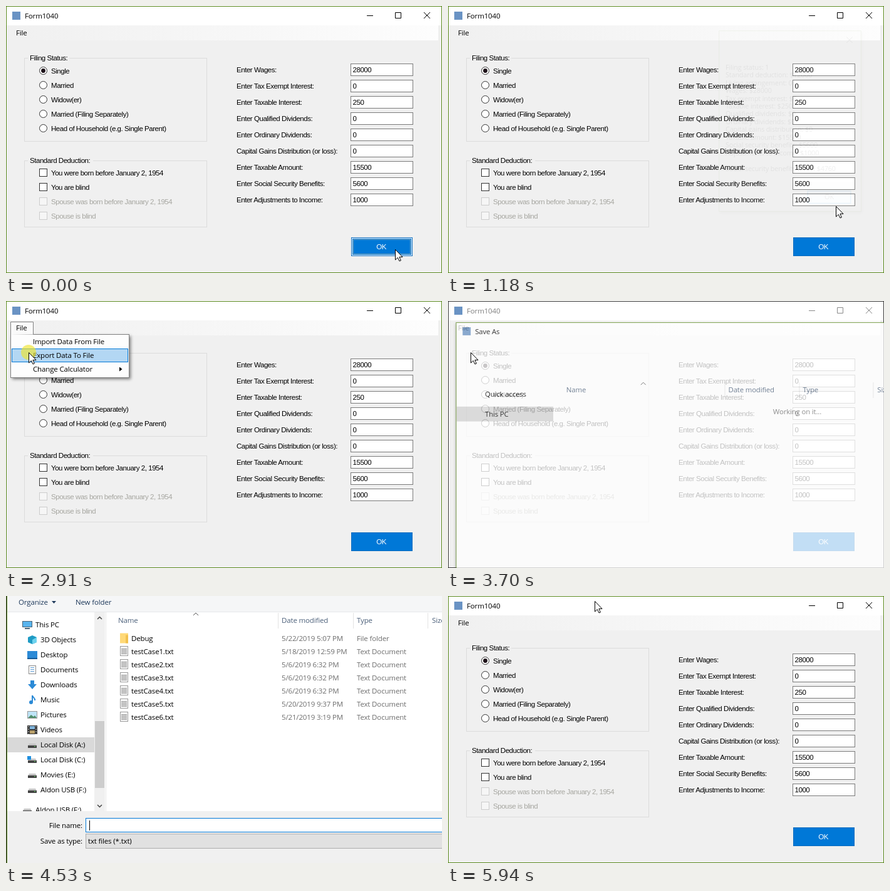
Write an HTML page that moves like this. It is 696 by 427 pixels and loops after 6890 ms.

```html
<!DOCTYPE html>
<html lang="en">
<head>
<meta charset="utf-8">
<title>Tax form</title>
<style>
html, body { margin: 0; width: 100%; height: 100%; overflow: hidden; background: #f0f0f0; }
svg { display: block; width: 696px; height: 427px; }
text { font: 11.5px "Open Sans", "Noto Sans", sans-serif; letter-spacing: -.15px; white-space: pre; }
.form text { font: 11.5px "Liberation Sans", Arial, sans-serif; letter-spacing: -.45px; }
.form .ui text { font: 11.5px "Open Sans", "Noto Sans", sans-serif; letter-spacing: -.15px; }
.end { text-anchor: end; }
.mid { text-anchor: middle; }
.idle .chrome { stroke: #8a8a8a; }
.idle .title { fill: #808080; }
.idle .edge { stroke: #3c3c3c; }
.chrome { stroke: #000; fill: none; }
.edge { stroke: #5b8a1e; fill: none; }
</style>
</head>
<body>
<svg viewBox="0 0 696 427" xmlns="http://www.w3.org/2000/svg">
  <defs>
    <linearGradient id="strip"><stop stop-color="#f0f0f0"/><stop offset="1" stop-color="#fdfdfd"/></linearGradient>
    <filter id="soft" x="-10%" y="-10%" width="120%" height="120%"><feGaussianBlur stdDeviation="2.5"/></filter>
  </defs>
  <g id="form" class="form"></g>
  <g id="box"></g>
  <g id="save"></g>
  <circle id="click" r="12" fill="#f0e52c" fill-opacity=".65"/>
  <path id="cursor" d="M.5 .5V17L4.3 13.4L7 19L9.4 18L6.9 12.4H12Z" fill="#fff" stroke="#000"/>
</svg>
<script>
const LOOP = 6890;
const $ = id => document.getElementById(id);

// Drawing helpers; y of a text is its vertical middle.
const text = (x, y, s, fill = '#000', cls = '') =>
  `<text x="${x}" y="${y + 4}" fill="${fill}" class="${cls}">${s}</text>`;
const rect = (x, y, w, h, fill, more = '') =>
  `<rect x="${x}" y="${y}" width="${w}" height="${h}" fill="${fill}" ${more}/>`;
const frame = (x, y, w, h, fill, stroke, more = '') =>
  rect(x + .5, y + .5, w - 1, h - 1, fill, `stroke="${stroke}" ${more}`);
const path = (d, stroke, fill = 'none', more = '') =>
  `<path d="${d}" stroke="${stroke}" fill="${fill}" ${more}/>`;
const group = (id, body, cls = '') => `<g id="${id}" class="${cls}">${body}</g>`;
const each = (list, fn) => list.map(fn).join('');

function buildForm() {
  const status = ['Single', 'Married', 'Widow(er)', 'Married (Filing Separately)',
    'Head of Household (e.g. Single Parent)'];
  const checks = ['You were born before January 2, 1954', 'You are blind',
    'Spouse was born before January 2, 1954', 'Spouse is blind'];
  const fields = [['Enter Wages:', 28000], ['Enter Tax Exempt Interest:', 0],
    ['Enter Taxable Interest:', 250], ['Enter Qualified Dividends:', 0],
    ['Enter Ordinary Dividends:', 0], ['Capital Gains Distribution (or loss):', 0],
    ['Enter Taxable Amount:', 15500], ['Enter Social Security Benefits:', 5600],
    ['Enter Adjustments to Income:', 1000]];
  const caption = (y, h, w, s) => frame(29, y, 292, h, 'none', '#dcdcdc') +
    rect(35, y - 3, w, 8, '#f0f0f0') + text(38, y, s);

  const top = rect(0, 0, 696, 427, '#f0f0f0') + rect(0, 0, 696, 31, '#fff') +
    rect(1, 31, 689, 24, 'url(#strip)') + rect(10, 9, 13, 13, '#6a93c4') +
    text(30, 15.5, 'Form1040', '#000', 'title') +
    '<path class="chrome" d="M576 15.5H586M621.5 10.5H630.5V19.5H621.5ZM667 10L677 20M677 10L667 20"/>';

  const left = caption(83, 134, 66, 'Filing Status:') +
    each(status, (s, i) => {
      const y = 103.5 + 23 * i;
      return `<circle cx="59.5" cy="${y}" r="6" fill="#fff" stroke="#333"/>` +
        (i ? '' : `<circle cx="59.5" cy="${y}" r="3.4" fill="#1c1018"/>`) + text(72, y + .5, s);
    }) +
    caption(247, 107, 104, 'Standard Deduction:') +
    each(checks, (s, i) => {
      const y = 267 + 23 * i, off = i > 1;
      return frame(53, y - 7, 13, 13, off ? '#f6f6f6' : '#fff', off ? '#ccc' : '#333') +
        text(72, y, s, off ? '#a6a6a0' : '#000');
    });

  const right = each(fields, ([label, value], i) => {
    const y = 102 + 26 * i;
    return text(368, y, label) + frame(550, y - 10, 100, 20, '#fff', '#7a7a7a') + text(553.5, y, value);
  });

  const button = frame(551, 370, 98, 30, '#0078d7', '#0a6cbf') +
    group('focus', frame(552, 371, 96, 28, 'none', '#fff') +
      frame(554, 373, 92, 24, 'none', '#e8c8a0', 'stroke-dasharray="1 1"')) +
    text(599, 385, 'OK', '#fff', 'mid');

  const menu = rect(10, 56, 189, 69, '#000', 'opacity=".5" filter="url(#soft)"') +
    frame(7, 53, 190, 70, '#fdfdfd', '#808080') +
    path('M7.5 54V33.5H43.5V53.5', '#808080', '#fafafa') +
    `<rect id="pick" x="9.5" width="185" height="21" fill="#b3d7f3" stroke="#0078d7"/>` +
    each(['Import Data From File', 'Export Data To File', 'Change Calculator'],
      (s, i) => text(43, 65 + 22 * i, s)) +
    path('M181 105.5L185.5 109L181 112.5Z', 'none', '#000');

  $('form').innerHTML = `<g class="ui">${top}</g>` + left + right + button +
    group('menu', menu, 'ui') + `<g class="ui">${text(16, 43, 'File')}</g>` +
    '<rect class="edge" x=".5" y=".5" width="695" height="426"/>';
}

function buildBox() {
  const lines = ['Filing status: 1', 'Standard deduction: $12000', 'Living arrangement: 0',
    'Wages: $28000', 'Tax exempt interest: $0', 'Taxable interest: $250',
    'Qualified dividends: $0', 'Ordinary dividends: $0', 'Capital gains distribution: $0',
    'Taxable amount: $15500', 'Social security benefits: $5600',
    'Adjustments to income: $1000', '', 'Social security benefits value: $4760'];
  $('box').innerHTML = rect(427, 33, 242, 308, '#000', 'opacity=".35" filter="url(#soft)"') +
    frame(425, 30, 242, 308, '#fff', '#5b8a1e') + rect(426, 289, 240, 48, '#f0f0f0') +
    path('M642 41L652 51M652 41L642 51', '#000') +
    each(lines, (s, i) => text(436.5, 92.5 + 13.25 * i, s)) +
    '<rect id="boxOk" x="576" y="303" width="73" height="21" stroke="#0078d7" stroke-width="2"/>' +
    text(612.5, 313.5, 'OK', '#000', 'mid');
}

function navIcon(kind, x, y) {
  const blue = '#2b8ad6';
  const art = {
    pc: () => frame(-8, -6, 16, 10, '#58b4ee', '#4a6478') + rect(-4, 5, 8, 2, '#4a6478'),
    cube: () => path('M0 -7L7 -4V4L0 7L-7 4V-4Z', 'none', '#1f9bc4') + path('M0 0L7 -4V4L0 7Z', 'none', '#6fd3ee'),
    desk: () => rect(-8, -6, 16, 11, blue) + rect(-8, 5, 16, 2, '#155a96'),
    doc: () => frame(-6, -7, 12, 14, '#fff', '#8a8a8a') + path('M-3 -3.5H3M-3 -.5H3M-3 2.5H3', '#5b9bd5'),
    down: () => path('M-3 -7H3V-1H7L0 7L-7 -1H-3Z', 'none', blue),
    note: () => path('M0 -7C1 -3 5 -3 4 1', blue, 'none', 'stroke-width="2"') +
      path('M0 -7V4', blue, 'none', 'stroke-width="2"') + `<circle cx="-2" cy="4" r="3" fill="${blue}"/>`,
    pic: () => frame(-8, -6, 16, 12, '#bfe4f7', '#999') + path('M-7 5L-2 0L2 3L4 1L7 5Z', 'none', '#4f8f6a'),
    film: () => rect(-8, -7, 16, 14, '#333') + rect(-4, -6, 8, 5, '#7fb2d9') + rect(-4, 1, 8, 5, '#b9a06a') +
      path('M-6 -6V7M6 -6V7', '#ddd', 'none', 'stroke-dasharray="2 2"'),
    disk: () => path('M-5 -2H5L7 1H-7Z', 'none', '#c4c4c4') + rect(-7, 1, 14, 4, '#444') + rect(3, 2, 2, 1, '#6d6'),
    system: () => art.disk() + rect(-8, -6, 6, 6, '#1f8fe0')
  };
  return `<g transform="translate(${x} ${y})">${art[kind]()}</g>`;
}

function buildSave() {
  const nav = [['cube', '3D Objects'], ['desk', 'Desktop'], ['doc', 'Documents'],
    ['down', 'Downloads'], ['note', 'Music'], ['pic', 'Pictures'], ['film', 'Videos'],
    ['disk', 'Local Disk (A:)'], ['system', 'Local Disk (C:)'], ['disk', 'Movies (E:)'],
    ['disk', 'Aldon USB (F:)']];
  const dates = ['5/22/2019 5:07 PM', '5/18/2019 12:59 PM', '5/6/2019 6:32 PM', '5/6/2019 6:32 PM',
    '5/6/2019 6:32 PM', '5/20/2019 9:37 PM', '5/21/2019 3:19 PM'];
  const crumbs = [[130, '«'], [146, 'xampp'], [205, 'htdocs'], [264, 'C++'],
    [311, 'IncomeTaxCalculator'], [445, 'IncomeTaxCalculator']];
  const chev = (x, y) => path(`M${x - 2} ${y - 3.5}L${x + 1.5} ${y}L${x - 2} ${y + 3.5}`, '#555');
  const folder = (x, y) => rect(x, y - 8, 13, 16, '#ffd978') + rect(x + 9, y - 5, 4, 13, '#f2c14e');
  const ink = '#4c607a', grey = '#6d6d6d', navy = '#1e395b';

  const heads = each([[177, 'Name'], [438, 'Date modified'], [558, 'Type'], [678, 'Size']],
    ([x, s]) => text(x, 109, s, ink)) +
    path('M432.5 97V122M552.5 97V122M671.5 97V122', '#e3e3e3') +
    path('M297 101L301 97L305 101', '#555');

  const loading = rect(0, 136, 156, 24, '#d4d4d4') + text(46, 116, 'Quick access') +
    text(46, 148, 'This PC');

  const rows = each(dates, (d, i) => {
    const y = 137.5 + 21 * i;
    const icon = i ? frame(180, y - 8.5, 13, 16, '#fff', '#999') +
      path(`M182 ${y - 4}H191M182 ${y - 2}H191M182 ${y}H191M182 ${y + 2}H191M182 ${y + 4}H191`, '#888') :
      folder(180, y);
    return icon + text(198, y, i ? `testCase${i}.txt` : 'Debug') + text(438, y, d, grey) +
      text(558, y, i ? 'Text Document' : 'File folder', grey);
  });

  const full =
    path('M26 46H14M18.5 41.5L14 46L18.5 50.5M41 46H53M48.5 41.5L53 46L48.5 50.5', '#c4c4c4') +
    path('M67 45L70 48L73 45', '#c4c4c4') +
    path('M92 52V40M87.5 44.5L92 40L96.5 44.5', '#444', 'none', 'stroke-width="1.5"') +
    frame(107, 34, 800, 24, '#fff', '#d9d9d9') + folder(111, 46) +
    each(crumbs, ([x, s]) => text(x, 46, s)) + each([193, 251, 298, 432, 568], x => chev(x, 46)) +
    path('M683 45L687 49L691 45', '#444') +
    rect(0, 66, 950, 30, '#f5f6f7') + rect(0, 95, 950, 1, '#e6e8ea') +
    text(18, 80, 'Organize', navy) + path('M71 78H78L74.5 82Z', 'none', navy) + text(109, 80, 'New folder', navy) +
    rect(0, 296, 139, 24, '#d9d9d9') + navIcon('pc', 32, 116) + text(45, 116, 'This PC') +
    each(nav, ([kind, s], i) => navIcon(kind, 40, 140 + 24 * i) + text(53, 140 + 24 * i, s)) +
    navIcon('disk', 32, 412) + text(45, 412, 'Aldon USB (F:)') +
    rect(139, 96, 17, 318, '#f0f0f0') + rect(140, 270, 15, 107, '#cdcdcd') +
    path('M144 107L147.5 103.5L151 107M144 404L147.5 407.5L151 404', '#444', 'none', 'stroke-width="1.5"') +
    rect(157, 96, 1, 318, '#e8e8e8') +
    rect(0, 414, 950, 160, '#f0f0f0') +
    text(120, 437, 'File name:', '#000', 'end') + text(120, 462, 'Save as type:', '#000', 'end') +
    `<rect id="input" x="125.5" y="425.5" width="780" height="22" fill="#fff" stroke="#0078d7"/>` +
    '<text id="typed" x="131" y="440"></text><path id="caret" stroke="#000" d="M0 429V445"/>' +
    frame(125, 450, 781, 24, '#e1e1e1', '#adadad') + text(129, 462, 'txt files (*.txt)');

  $('save').innerHTML = rect(-1, 2, 950, 570, '#000', 'opacity=".3" filter="url(#soft)"') +
    rect(0, 0, 950, 570, '#fff') + rect(10, 8, 13, 13, '#6a93c4') + text(30, 15, 'Save As') +
    group('loading', loading) + group('full', full) + group('rows', rows) + heads +
    `<g id="working">${text(510, 144, 'Working on it...', grey)}</g>` +
    '<rect class="edge" x="-.5" y=".5" width="950" height="570"/>';
}

// Each track lists [time, value, ...]; the newest entry not after t holds.
const tracks = {
  cursor: [[0, 621, 389], [560, 621, 374], [640, 620, 346], [720, 619, 320], [1480, 590, 306],
    [1550, 520, 273], [1630, 400, 216], [1700, 270, 155], [1780, 150, 99], [1850, 70, 61],
    [1930, 29, 42], [2310, 30, 52], [2370, 33, 68], [2430, 36, 82], [4240, -50, -50], [5940, 234, 8]],
  box: [[0, 0, .9], [320, .35, .94], [400, .75, .98], [480, 1, 1], [1030, .75, .98],
    [1100, .35, .96], [1180, .06, .94], [1250, 0, .9]],
  save: [[0, 0, 0], [3610, .35, .03], [3700, .76, .009], [3780, .96, .002], [3850, 1, 0],
    [5720, .75, .004], [5790, .3, .015], [5870, 0, 0]],
  slide: [[0, 0], [4240, .28], [4320, .583], [4390, .78], [4450, .9], [4520, .97], [4590, 1]],
  chars: [[0, 0], [4910, 2], [4980, 3], [5050, 4], [5120, 5], [5200, 6], [5270, 7],
    [5340, 8], [5420, 9], [5500, 10], [5590, 11]],
  pick: [[0, -99], [2310, 54.5], [2370, 76.5]]
};
const at = (name, t) => tracks[name].findLast(k => k[0] <= t).slice(1);
const within = (t, ...spans) => spans.some(([a, b]) => t >= a && t < b);
const set = (id, attrs) => { for (const k in attrs) $(id).setAttribute(k, attrs[k]); };
const show = (id, on) => { $(id).style.display = on ? '' : 'none'; };

function draw(t) {
  const [cx, cy] = at('cursor', t);
  set('cursor', { transform: `translate(${cx} ${cy})` });
  set('click', { cx, cy });
  show('click', within(t, [80, 160], [950, 1030], [2000, 2160], [2910, 3060]));

  $('form').classList.toggle('idle', within(t, [240, 1100], [3380, 5870]));
  show('focus', t < 240);
  show('menu', within(t, [2000, 3060]));
  set('pick', { y: at('pick', t)[0] });

  const [boxAlpha, s] = at('box', t);
  show('box', boxAlpha > 0);
  set('box', { opacity: boxAlpha, transform: `translate(546 184) scale(${s}) translate(-546 -184)` });
  set('boxOk', { fill: t < 790 ? '#e1e1e1' : t < 950 ? '#e5f1fb' : '#cce4f7' });

  const [alpha, k] = at('save', t);
  const [slide] = at('slide', t);
  const x = 12 + 160 * k - Math.round(10 * slide);
  const y = 30 + 450 * k - Math.round(103 * slide);
  show('save', alpha > 0);
  set('save', { opacity: alpha, transform: `translate(${x} ${y}) scale(${1 - k})` });
  show('loading', t < 3930);
  show('full', t >= 3930);
  show('working', t < 4000);
  show('rows', t >= 4000);
  $('typed').textContent = 'Aldon Viros'.slice(0, at('chars', t)[0]);
  set('caret', { transform: `translate(${Math.round(131 + $('typed').getComputedTextLength()) + .5} 0)` });
  show('caret', t >= 4080);
}

buildForm();
buildBox();
buildSave();
(function tick() {
  draw(performance.now() % LOOP);
  requestAnimationFrame(tick);
})();
</script>
</body>
</html>
```
